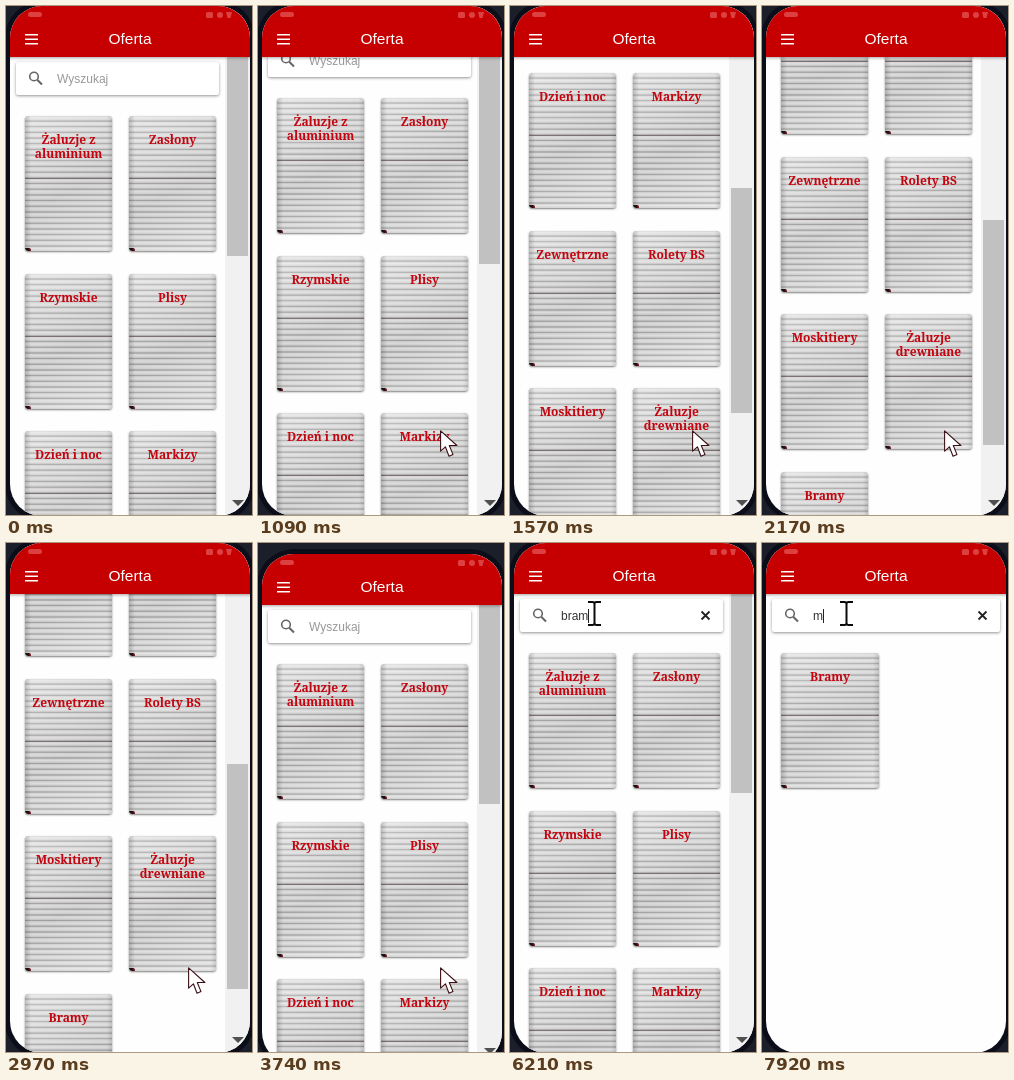
Write an HTML page that moves like this. It is 246 px wide and 509 px high and loops after 8000 ms.

```html
<!DOCTYPE html>
<html lang="pl">
<head>
<meta charset="utf-8">
<title>Oferta</title>
<style>
html, body { margin: 0; width: 100%; height: 100%; overflow: hidden; background: #1b1f2a; }
div, svg { position: absolute; box-sizing: border-box; }
#stage { left: 0; top: 0; width: 246px; height: 509px; overflow: hidden; background: #1b1f2a; font-family: "Liberation Sans", Arial, sans-serif; }
#phone { left: 4px; top: 0; width: 240px; height: 510px; border-radius: 32px; box-shadow: 0 0 0 5px #0b0e19; }
#screen { inset: 0; border-radius: 32px; overflow: hidden; background: #fefefe; }
#view { left: -4px; top: 0; width: 248px; height: 510px; }
#list { left: 0; top: 0; width: 219px; height: 1063px; }
#search { left: 10px; top: 56px; width: 203px; height: 33px; border-radius: 2px; background: #fff; box-shadow: 0 1px 3px rgba(0,0,0,.42); }
#search svg { left: 0; top: 0; width: 100%; height: 100%; overflow: visible; fill: none; }
#text { left: 41px; top: 9px; font-size: 12px; line-height: 16px; white-space: pre; }
#caret { top: 10px; width: 1px; height: 14px; background: #222; }
#clear { left: auto !important; right: 12px; top: 11px !important; width: 11px !important; height: 11px !important; }
.card {
  width: 87px; height: 135px; border-radius: 3px; overflow: hidden;
  box-shadow: 0 1px 2px rgba(0,0,0,.5);
  background:
    linear-gradient(rgba(60,40,40,.55), rgba(60,40,40,.55)) 0 62px / 100% 1px no-repeat,
    linear-gradient(90deg, rgba(40,40,40,.22), transparent 7%, transparent 94%, rgba(40,40,40,.14)),
    linear-gradient(155deg, rgba(255,255,255,.28), rgba(120,120,120,.1) 55%, rgba(255,255,255,.22)),
    repeating-linear-gradient(#cfcfcf 0, #e6e6e6 1.8px, #d6d6d6 3.8px, #a2a2a2 5px, #b4b4b4 5.68px);
}
.card::after { content: ""; position: absolute; left: 0; bottom: 0; width: 6px; height: 3px; border-radius: 0 2px 0 3px; background: linear-gradient(90deg, #1c1014 55%, #8c1a22); }
.label { left: -10px; right: -10px; top: 17px; text-align: center; white-space: pre; font: bold 12px/14px "Noto Serif", serif; color: #c4050f; }
#bar { left: 219px; top: 0; width: 26px; height: 510px; background: #f1f1f1; }
#thumb { left: 2px; width: 21px; height: 225px; background: #c1c1c1; }
#bar svg { left: 7px; top: 494px; width: 12px; height: 7px; fill: #505050; }
#head { left: 0; top: 0; width: 248px; height: 51px; background: #c60000; box-shadow: 0 1px 3px rgba(0,0,0,.35); }
#head svg { left: 0; top: 0; width: 248px; height: 51px; }
#title { left: 4px; width: 240px; top: 23px; text-align: center; font-size: 15.5px; line-height: 20px; color: #fff; }
#arrow, #beam { left: 0; top: 0; overflow: visible; }
</style>
</head>
<body>
<div id="stage">
  <div id="phone"><div id="screen"><div id="view">
    <div id="list">
      <div id="search">
        <svg stroke="#666" stroke-width="1.6"><circle cx="18" cy="14.5" r="4.3"/><path d="M21.2 17.7L26 22.5" stroke-width="2"/></svg>
        <div id="text"></div><div id="caret"></div>
        <svg id="clear" stroke="#222" stroke-width="1.8"><path d="M1.5 1.5l8 8m0-8l-8 8"/></svg>
      </div>
    </div>
    <div id="bar"><div id="thumb"></div><svg><path d="M0 0h12L6 6z"/></svg></div>
    <div id="head">
      <svg>
        <g fill="#dc4040"><rect x="22" y="6" width="14" height="5" rx="2.5"/><rect x="200" y="6" width="7" height="6" rx="1.5"/><circle cx="214" cy="9" r="3"/><path d="M220 6h6l-1.5 6h-3z"/></g>
        <path d="M19 28.7h13m-13 4.5h13m-13 4.5h13" stroke="#fff" stroke-width="1.4"/>
      </svg>
      <div id="title">Oferta</div>
    </div>
  </div></div></div>
  <svg id="arrow" width="20" height="29"><path d="M.6.8v20.4l4.8-4.4 3.6 9.4 4-1.6-3.7-9.1h7.6z" fill="#fff" stroke="#3a1016" stroke-width="1.1" stroke-linejoin="round"/></svg>
  <svg id="beam" width="16" height="25"><path d="M1 1h4.5q2 0 2 2v19q0 2-2 2H1M14 1H9.5q-2 0-2 2M7.5 22q0 2 2 2H14" fill="none" stroke="#0a0a0a" stroke-width="2"/></svg>
</div>
<script>
const LOOP = 8000;
const $ = id => document.getElementById(id);
const names = ["Żaluzje z\naluminium", "Zasłony", "Rzymskie", "Plisy", "Dzień i noc", "Markizy",
  "Zewnętrzne", "Rolety BS", "Moskitiery", "Żaluzje\ndrewniane", "Bramy"];

// Each table lists [time, value...]; a value holds until the next time.
const scrollSteps = [[0, 0],
  [1090, 18], [1160, 68], [1230, 120], [1300, 172], [1370, 223], [1440, 270], [1510, 318], [1570, 358], [1640, 385],
  [2100, 402], [2170, 432], [2240, 455], [2310, 467],
  [2970, 447], [3040, 390], [3130, 320], [3210, 270],
  [3610, 190], [3670, 60], [3740, 0]];
const phoneSteps = [[0, 0], [3740, 11], [3810, 14], [3940, 8], [4010, 0]];
const arrowSteps = [[0, -50, 0], [410, 203, 447], [480, 182, 424],
  [4010, 172, 370], [4080, 152, 275], [4150, 128, 180], [4220, 106, 110], [4290, 90, 65], [4360, 82, 45],
  [4570, 64, 36], [4840, 70, 39], [4910, 78, 44], [4970, -50, 0]];
const beamSteps = [[0, -50, 0], [4970, 77, 54], [5040, 77, 58], [5240, 84, 51], [5340, 81, 62], [5440, 77, 58]];
const textSteps = [[0, ""], [5840, "b"], [6040, "br"], [6130, "bra"], [6210, "bram"],
  [7270, "bra"], [7400, "br"], [7530, "b"], [7730, ""], [7920, "m"]];
const caretSteps = [[0, 0], [5440, 1], [6740, 0], [7730, 1]];
const clearSteps = [[0, 0], [5900, 1], [7730, 0], [7920, 1]];
const filterSteps = [[0, 0], [6540, 1]];

const at = (steps, t) => steps.findLast(s => s[0] <= t).slice(1);
const move = (el, x, y) => el.style.transform = `translate(${x}px, ${y}px)`;
const show = (el, on) => el.style.display = on ? "" : "none";

const cards = names.map((name, i) => {
  const card = document.createElement("div");
  const label = document.createElement("div");
  card.className = "card";
  label.className = "label";
  label.textContent = name;
  card.append(label);
  $("list").append(card);
  return card;
});

function layout(filtered) {
  cards.forEach((card, i) => {
    const last = i === cards.length - 1;
    const slot = filtered ? 0 : i;
    show(card, !filtered || last);
    card.style.left = (slot % 2 ? 123 : 19) + "px";
    card.style.top = 110 + 157.5 * (slot >> 1) + "px";
    card.style.width = (filtered ? 98 : 87) + "px";
  });
  $("search").style.width = (filtered ? 228 : 203) + "px";
  show($("bar"), !filtered);
}

function draw(t) {
  const [scroll] = at(scrollSteps, t);
  const [text] = at(textSteps, t);
  layout(at(filterSteps, t)[0]);
  move($("phone"), 0, at(phoneSteps, t)[0]);
  move($("list"), 0, -scroll);
  $("thumb").style.top = 25 + scroll * 0.4385 + "px";
  $("text").textContent = text || "Wyszukaj";
  $("text").style.color = text ? "#333" : "#999";
  $("caret").style.left = 41 + (text ? $("text").offsetWidth : 0) + "px";
  show($("caret"), at(caretSteps, t)[0]);
  show($("clear"), at(clearSteps, t)[0]);
  move($("arrow"), ...at(arrowSteps, t));
  move($("beam"), ...at(beamSteps, t));
}

const start = performance.now();
function tick() {
  draw((performance.now() - start) % LOOP);
  requestAnimationFrame(tick);
}
tick();
</script>
</body>
</html>
```
